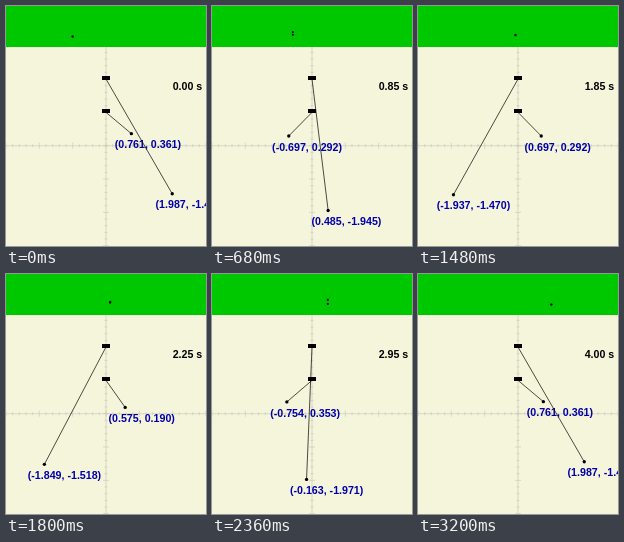
Recreate the animation shown at these times as an HTML page with a canvas. Size 200 px wide and 240 px high, loop 3240 ms.

```html
<!DOCTYPE html>
<html lang="en">
<head>
<meta charset="utf-8">
<title>Two pendulums</title>
<style>
html, body { margin: 0; width: 100%; height: 100%; overflow: hidden; background: #f5f5dc; }
canvas { display: block; }
</style>
</head>
<body>
<canvas id="stage" width="200" height="240"></canvas>
<script>
const ctx = document.getElementById('stage').getContext('2d');
const UNIT = 100 / 3, STEP_MS = 40, STEPS = 81;
const LENGTH = 9.80665 / Math.PI ** 2; // period of exactly 2 s
const px = x => 100 + x * UNIT;
const py = y => 139.7 - y * UNIT;

const pendulums = [
  { pivot: 1, length: LENGTH, swing: 50, period: 2 },
  { pivot: 2, length: 4 * LENGTH, swing: 30, period: 4 },
];

function line(x1, y1, x2, y2) {
  ctx.beginPath();
  ctx.moveTo(x1, y1);
  ctx.lineTo(x2, y2);
  ctx.stroke();
}

function dot(x, y, r) {
  ctx.beginPath();
  ctx.arc(x, y, r, 0, 2 * Math.PI);
  ctx.fill();
}

function drawAxes() {
  ctx.strokeStyle = '#c4c4b8';
  ctx.lineWidth = 0.6;
  line(0, py(0), 200, py(0));
  line(px(0), 40, px(0), 240);
  for (let i = -15; i <= 15; i++) {
    const size = i % 5 ? 1.5 : 3;
    const x = px(i / 5), y = py(i / 5);
    line(x, py(0) - size, x, py(0) + size);
    line(px(0) - size, y, px(0) + size, y);
  }
}

function drawPendulum({ pivot, length, swing, period }, t) {
  const omega = 2 * Math.PI / period;
  const amplitude = swing * Math.PI / 180;
  const angle = amplitude * Math.cos(omega * t);
  const speed = Math.abs(length * amplitude * omega * Math.sin(omega * t));
  const x = length * Math.sin(angle);
  const y = pivot - length * Math.cos(angle);

  ctx.strokeStyle = ctx.fillStyle = '#000';
  ctx.lineWidth = 0.7;
  line(px(0), py(pivot), px(x), py(y));
  ctx.fillRect(96, Math.round(py(pivot + 0.1)), 8, 4);
  dot(px(x), py(y), 1.67);
  // speed against time, in the green strip
  dot(px(t / 2 - 1), 30.5 - 1.4 * speed, 1.1);

  ctx.fillStyle = '#0000aa';
  ctx.fillText(`(${x.toFixed(3)}, ${y.toFixed(3)})`, px(x - 0.5), py(y) + 14.7);
}

function draw(t) {
  ctx.fillStyle = '#f5f5dc';
  ctx.fillRect(0, 0, 200, 240);
  drawAxes();
  ctx.fillStyle = '#00c800';
  ctx.fillRect(0, 0, 200, 41);
  ctx.font = 'bold 10.67px "Liberation Sans", Arial, sans-serif';
  for (const p of pendulums) drawPendulum(p, t);
  ctx.fillStyle = '#000';
  ctx.fillText(t.toFixed(2) + ' s', px(2), 84);
}

const start = performance.now();
function tick() {
  const elapsed = performance.now() - start;
  draw(Math.floor(elapsed / STEP_MS) % STEPS / 20);
  requestAnimationFrame(tick);
}
tick();
</script>
</body>
</html>
```
